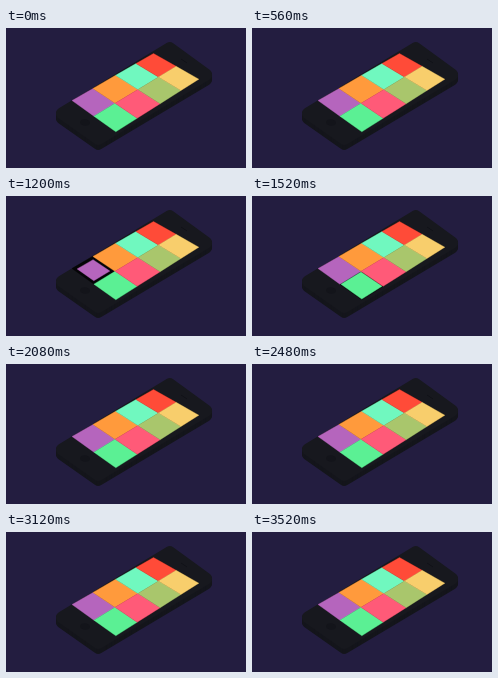
An HTML page with a canvas for the animation above (3600 ms loop, 240 by 140 pixels).

```html
<!DOCTYPE html>
<html lang="en">
<head>
<meta charset="utf-8">
<title>Phone tiles</title>
<style>
html, body { margin: 0; width: 100%; height: 100%; overflow: hidden; background: #231d40; }
canvas { display: block; width: 100vw; height: 100vh; }
</style>
</head>
<body>
<canvas id="stage"></canvas>
<script>
const WIDTH = 240, HEIGHT = 140, LOOP = 3600, STEP = 80, PRESS = 400, DEPTH = 0.24;
const canvas = document.getElementById('stage');
const ctx = canvas.getContext('2d');

// Corners in order: left, top, right, bottom.
const body = [[45, 85], [164, 13], [211, 47], [92, 118]];
const screen = [[66, 72.5], [147.5, 25.5], [192.8, 51.2], [109.8, 103.8]];

// Columns run along the phone and get shorter towards its far end.
const columnEdges = [0, 0.257, 0.535, 0.785, 1];
const tiles = [
  { col: 0, row: 0, color: '#b565bd', press: 1000 },
  { col: 1, row: 0, color: '#ff9a3c' },
  { col: 2, row: 0, color: '#70f8bf' },
  { col: 3, row: 0, color: '#ff4b38' },
  { col: 0, row: 1, color: '#5bf094', press: 1460 },
  { col: 1, row: 1, color: '#ff5a78' },
  { col: 2, row: 1, color: '#a9c66c' },
  { col: 3, row: 1, color: '#f8ce6c' }
];

const mix = (a, b, k) => [a[0] + (b[0] - a[0]) * k, a[1] + (b[1] - a[1]) * k];

function onScreen(u, v) {
  const [left, top, right, bottom] = screen;
  return mix(mix(left, top, u), mix(bottom, right, u), v);
}

function polygon(points, fill) {
  ctx.beginPath();
  points.forEach(([x, y]) => ctx.lineTo(x, y));
  ctx.closePath();
  ctx.fillStyle = ctx.strokeStyle = fill;
  ctx.fill();
  // A hairline of the same colour closes the seams between tiles.
  ctx.lineWidth = 0.4;
  ctx.stroke();
}

function slab(points, radius, fill, dy = 0) {
  const start = mix(points[0], points[1], 0.5);
  ctx.beginPath();
  ctx.moveTo(start[0], start[1] + dy);
  for (let i = 1; i <= 4; i++) {
    const a = points[i % 4], b = points[(i + 1) % 4];
    ctx.arcTo(a[0], a[1] + dy, b[0], b[1] + dy, radius);
  }
  ctx.closePath();
  ctx.fillStyle = fill;
  ctx.fill();
}

function drawPhone() {
  for (let dy = 5; dy > 0; dy--) slab(body, 6, '#14151b', dy);
  slab(body, 6, '#17181e');
  ctx.fillStyle = '#13141a';
  ctx.beginPath();
  ctx.ellipse(79, 94.5, 5, 3.2, 0.1, 0, Math.PI * 2);
  ctx.fill();
  ctx.strokeStyle = '#111218';
  ctx.lineWidth = 1;
  ctx.beginPath();
  ctx.moveTo(175, 31);
  ctx.lineTo(181, 35);
  ctx.stroke();
}

function tileScale(press, time) {
  const phase = (time - press) / PRESS;
  return phase > 0 && phase < 1 ? 1 - DEPTH * Math.sin(Math.PI * phase) ** 2 : 1;
}

function drawTile({ col, row, color, press }, time) {
  const inset = (1 - tileScale(press, time)) / 2;
  const near = columnEdges[col], length = columnEdges[col + 1] - near;
  const u = k => near + length * k;
  const v = k => (row + k) / 2;
  const lo = inset, hi = 1 - inset;
  polygon([
    onScreen(u(lo), v(lo)),
    onScreen(u(hi), v(lo)),
    onScreen(u(hi), v(hi)),
    onScreen(u(lo), v(hi))
  ], color);
}

function draw(now) {
  const time = Math.floor((now % LOOP) / STEP) * STEP;
  const ratio = window.devicePixelRatio || 1;
  const w = Math.round(innerWidth * ratio), h = Math.round(innerHeight * ratio);
  if (canvas.width !== w || canvas.height !== h) {
    canvas.width = w;
    canvas.height = h;
  }
  ctx.setTransform(w / WIDTH, 0, 0, h / HEIGHT, 0, 0);
  ctx.fillStyle = '#231d40';
  ctx.fillRect(0, 0, WIDTH, HEIGHT);
  drawPhone();
  polygon(screen, '#050507');
  tiles.forEach(tile => drawTile(tile, time));
}

const start = performance.now();
function frame() {
  draw(performance.now() - start);
  requestAnimationFrame(frame);
}
frame();
</script>
</body>
</html>
```
